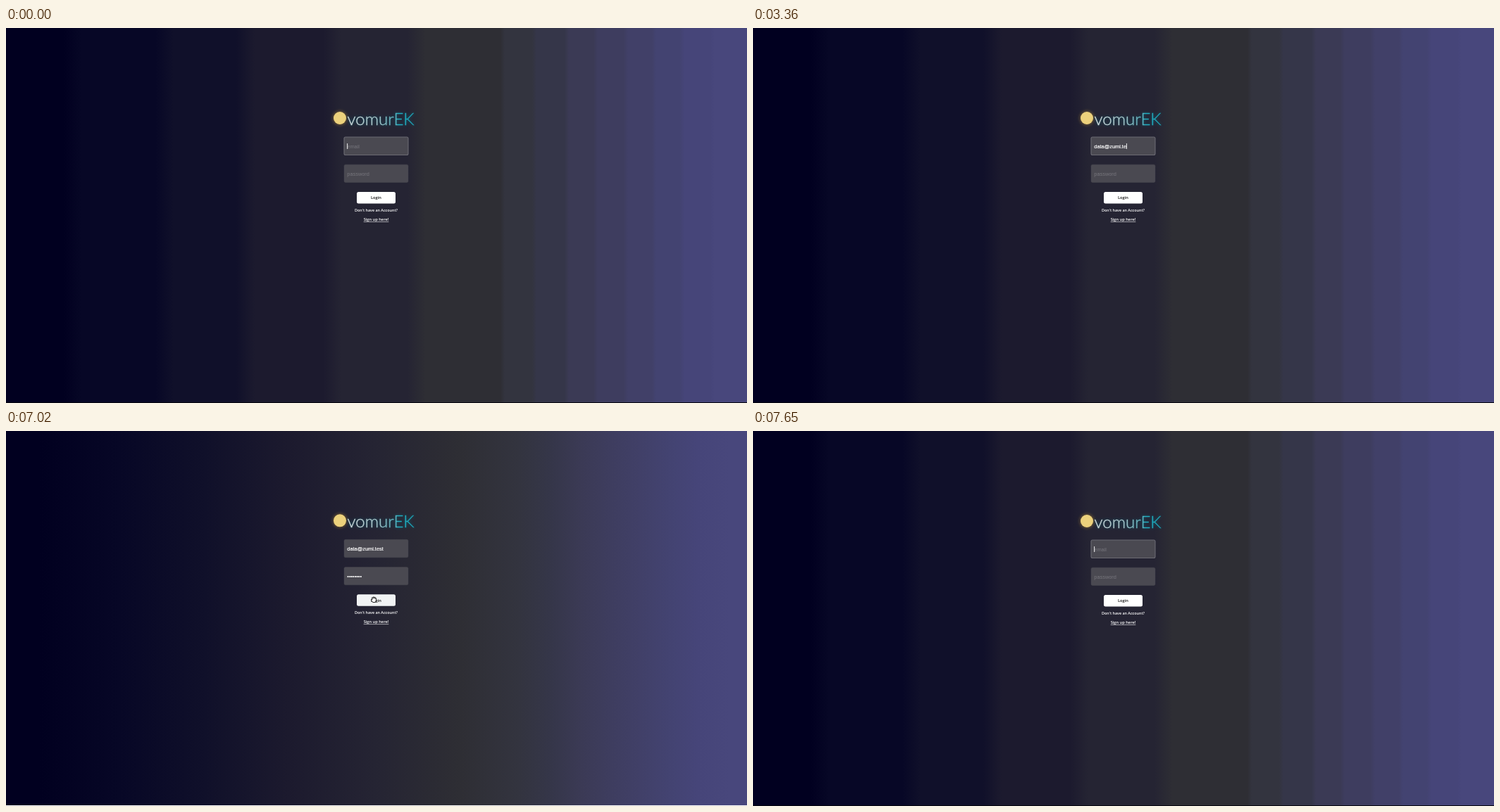
Write an HTML page that moves like this. It is 1052 px wide and 533 px high and loops after 7680 ms.

```html
<!DOCTYPE html>
<html lang="en">
<head>
<meta charset="utf-8">
<title>Login</title>
<style>
  html, body { margin: 0; width: 100%; height: 100%; overflow: hidden; background: #010020; }
  svg { display: block; width: 1052px; height: 533px; }
  text { font-family: "Liberation Sans", Arial, sans-serif; font-size: 7.4px; fill: #fff; white-space: pre; }
  .mid { text-anchor: middle; }
  .bold { stroke: #fff; stroke-width: .2px; }
  .note { font-family: "Open Sans", sans-serif; font-weight: 600; font-size: 5.7px; text-anchor: middle; }
  .brand { font-family: Lato, sans-serif; font-weight: 300; font-size: 24px; stroke-width: .35px; }
  .hint { fill: #77767d; }
  .ink { fill: #111; }
  .small { font-size: 6.5px; stroke: #111; stroke-width: .12px; }
  .field { fill: #4a4951; stroke: #4a4951; stroke-width: .4px; }
  .field.focus { stroke: #6b6a73; stroke-width: 1.1px; }
  .off { display: none; }
</style>
</head>
<body>
<svg viewBox="0 0 1052 533" xmlns="http://www.w3.org/2000/svg">
  <defs>
    <linearGradient id="banded"></linearGradient>
    <linearGradient id="smooth"></linearGradient>
    <linearGradient id="panel" x2="0" y2="1">
      <stop offset="0" stop-color="#2f2b57"/><stop offset=".15" stop-color="#2b2f5b"/>
      <stop offset=".85" stop-color="#044e77"/><stop offset="1" stop-color="#014f77"/>
    </linearGradient>
    <linearGradient id="wordmark" gradientUnits="userSpaceOnUse" x1="485" x2="583">
      <stop offset="0" stop-color="#d3dedf"/><stop offset=".45" stop-color="#a3c6cb"/>
      <stop offset=".7" stop-color="#55b4c1"/><stop offset=".74" stop-color="#20afc2"/>
      <stop offset="1" stop-color="#1ba0b4"/>
    </linearGradient>
    <filter id="glow" x="-20%" y="-40%" width="140%" height="180%"><feGaussianBlur stdDeviation="2"/></filter>
    <filter id="halo" filterUnits="userSpaceOnUse" x="0" y="0" width="1052" height="533"><feGaussianBlur stdDeviation="9"/></filter>
    <pattern id="dots" x="337" y="43" width="7.4" height="7.4" patternUnits="userSpaceOnUse">
      <circle cx="3.7" cy="3.7" r=".5" fill="#81818c" opacity=".65"/>
    </pattern>
    <g id="logo">
      <circle cx="474" cy="128" r="10" fill="#c99a35" opacity=".45" filter="url(#glow)"/>
      <circle cx="474" cy="128" r="9" fill="#ecd17c"/>
      <text class="brand" x="484.5" y="138" fill="none" style="fill:#118a9e" opacity=".7" filter="url(#glow)">vomurEK</text>
      <text class="brand" x="484.5" y="138" style="fill:url(#wordmark);stroke:url(#wordmark)">vomurEK</text>
    </g>
    <path id="hand" d="M-1.6 4 L-3.7 1 Q-4.3 -.2 -3.2 -.2 L-2.3 .5 L-3 -2.2 Q-2.6 -3.4 -1.8 -2.6 L-1.3 -1.4 L-1.2 -3.4 Q-.4 -4.4 .2 -3.4 L.4 -1.6 L.9 -3.2 Q1.8 -3.8 2.1 -2.8 L1.9 -.9 L2.5 -1.9 Q3.5 -2.1 3.5 -1.1 L2.8 2 L2 4 Z"/>
  </defs>

  <g id="login">
    <rect id="loginBack" width="1052" height="533"/>
    <rect id="edge" y="532" width="1052" height="1"/>
    <g id="form">
      <use href="#logo"/>
      <rect id="emailBox" class="field" x="480" y="155" width="91" height="25.5" rx="2"/>
      <rect id="passBox" class="field" x="480" y="194.2" width="91" height="25.3" rx="2"/>
      <text id="email" x="484.3" y="170.5"></text>
      <text id="pass" x="484.3" y="209.5"></text>
      <rect id="caret" width=".9" height="8" fill="#fff"/>
      <rect id="button" x="498" y="233" width="55" height="16.5" rx="2.5" fill="#fff"/>
      <text class="note ink" x="525.5" y="243.3">Login</text>
      <text class="note" x="525.5" y="261" style="font-size:5.4px">Don't have an Account?</text>
      <text class="note" x="525.5" y="274.2" text-decoration="underline">Sign up here!</text>
    </g>
    <use id="press" href="#hand" x="522.3" y="239.5" fill="#fff" stroke="#111" stroke-width=".9"/>
  </g>

  <g id="app">
    <rect width="1052" height="533" fill="url(#smooth)"/>
    <g filter="url(#halo)" fill="#08305f" opacity=".6">
      <rect x="31" y="40" width="293" height="318"/>
      <rect x="31" y="368" width="996" height="148"/>
    </g>
    <rect y="532" width="1052" height="1" fill="#fff"/>
    <use href="#logo" x="-438" y="-107.5"/>
    <text class="mid bold" x="1018" y="16">logout</text>

    <rect x="33" y="39.5" width="289" height="317" rx="2.5" fill="url(#panel)"/>
    <g id="tabs"></g>
    <rect x="61.5" y="84" width="231.5" height="248" rx="2.5" fill="#d6d7e1"/>
    <text x="72" y="98" style="fill:#6b6b73">type your query</text>
    <text class="ink small" x="68" y="326">clear</text>
    <text class="ink small" x="273.3" y="326">save</text>

    <rect x="333.5" y="39.5" width="692.5" height="316.5" fill="url(#dots)" stroke="#115385"/>
    <path d="M333.5 356V39.5H700" fill="none" stroke="#506078" opacity=".7"/>
    <rect x="342" y="288.5" width="14.5" height="59.5" fill="#fefefe"/>
    <path d="M342 303.4h14.5M342 318.2h14.5M342 333.1h14.5" stroke="#e5e5e8" stroke-width=".5"/>
    <g fill="none" stroke="#111" stroke-width="1.1">
      <path d="M345.8 296h6.6M349.1 292.7v6.6M345.8 310.5h6.6"/>
      <path d="M346.2 324.3v-1.8h1.9M350.2 322.5h1.9v1.8M352.1 326.5v1.8h-1.9M348.1 328.3h-1.9v-1.8"/>
      <path d="M347.9 340v-1.6a1.2 1.2 0 0 1 2.4 0" stroke-width=".8"/>
    </g>
    <rect x="346.8" y="339.6" width="4.6" height="3.6" rx=".5" fill="#111"/>
    <g stroke="#a9abb8" stroke-width="1.1" stroke-dasharray="1 1.1">
      <path d="M329.2 190v17M331.4 190v17M517 357.1h17M517 359.3h17"/>
    </g>

    <rect x="33" y="368" width="992" height="146" rx="2.5" fill="url(#panel)"/>
    <text x="38" y="383" style="font:700 9.8px Lato,sans-serif;fill:#f0f0f4">Query Results</text>
    <rect x="46" y="393" width="966" height="108" rx="2.5" fill="#d7d8e2" opacity=".46"/>

    <use id="grab" href="#hand" x="522" y="239" fill="#fff" stroke="#222" stroke-width=".4"/>
    <path id="arrow" d="M522 237.5v8.6l2-1.8 1.4 3 1.4-.7-1.4-2.9h2.5z" fill="#111" stroke="#eee" stroke-width=".8"/>
  </g>
</svg>
<script>
const $ = id => document.getElementById(id);
const LOOP = 7680, TICK = 30, KEY_GAP = 278.75;
const ADDRESS = 'data@zumi.test';
const CLICK = 7020, OPEN = 7050, RELEASE = 7200, RESET = 7650;

// Each band: left edge and colour.
const bands = [[0, '#010020'], [95, '#070726'], [225, '#10102a'], [340, '#1c1a2e'],
  [463, '#252433'], [583, '#2e2e34'], [705, '#33343f'], [750, '#353649'], [796, '#3b3a55'],
  [837, '#3e3d5f'], [880, '#414068'], [920, '#434371'], [960, '#464579'], [1003, '#48477c']];
const stop = (x, color) => `<stop offset="${x / 1052}" stop-color="${color}"/>`;

$('banded').innerHTML = bands.map(([x, color], i) => {
  const end = bands[i + 1]?.[0] ?? 1052;
  const soft = x < 700 ? 13 : 3;
  return stop(i ? x + soft : 0, color) + stop(end - (end < 700 ? 13 : 3), color);
}).join('');
$('smooth').innerHTML = bands.map(([x, color], i) =>
  stop((x + (bands[i + 1]?.[0] ?? 1052)) / 2, color)).join('');

$('tabs').innerHTML = ['Query', 'History', 'Settings'].map((name, i) => {
  const x = 33 + 96.5 * i;
  const back = i ? `<path d="M${x} 61.5v-19q0-2.5 2.5-2.5h91q2.5 0 2.5 2.5v19z" fill="#a5a2a4"/>` : '';
  return `${back}<text class="mid bold" x="${x + 48}" y="53.2">${name}</text>`;
}).join('');

const show = (id, on) => $(id).classList.toggle('off', !on);

function fill(id, value, hint) {
  $(id).textContent = value || hint;
  $(id).setAttribute('class', value ? 'bold' : 'hint');
}

function placeCaret(id, value, top) {
  const width = value ? $(id).getComputedTextLength() : 0;
  $('caret').setAttribute('x', 484.2 + width);
  $('caret').setAttribute('y', top);
}

// Steps 1-14 type the address, 15 moves on, 16-23 type the password, 24 reaches the button.
function drawLogin(step, clicked) {
  const address = ADDRESS.slice(0, step);
  const secret = '•'.repeat(Math.max(0, Math.min(8, step - 15)));
  const onEmail = step < 15, onPass = step >= 15 && step < 24, done = step >= 24;

  fill('email', address, 'email');
  fill('pass', secret, 'password');
  $('emailBox').classList.toggle('focus', onEmail);
  $('passBox').classList.toggle('focus', onPass);
  show('caret', !done && step !== 15);
  if (onEmail) placeCaret('email', address, 164);
  else placeCaret('pass', secret, 203);

  $('loginBack').setAttribute('fill', done ? 'url(#smooth)' : 'url(#banded)');
  $('edge').setAttribute('fill', done ? '#fff' : '#07070f');
  $('form').setAttribute('transform', `translate(0 ${done ? -.7 : 0})`);
  $('button').setAttribute('fill', clicked ? '#f1f3f4' : '#fff');
  show('press', done);
}

let last = '';
function draw(now) {
  const t = now % LOOP;
  const inApp = t >= OPEN && t < RESET;
  // Key presses land on the 30 ms clock.
  const clock = Math.floor(t / TICK) * TICK;
  const step = t >= RESET ? 0 : Math.min(24, Math.floor(clock / KEY_GAP));
  const clicked = t >= CLICK && t < OPEN;
  const released = t >= RELEASE;
  const state = [inApp, step, clicked, released].join();
  if (state === last) return;
  last = state;

  show('login', !inApp);
  show('app', inApp);
  show('grab', !released);
  show('arrow', released);
  if (!inApp) drawLogin(step, clicked);
}

const start = performance.now();
function loop() {
  draw(performance.now() - start);
  requestAnimationFrame(loop);
}
loop();
</script>
</body>
</html>
```
